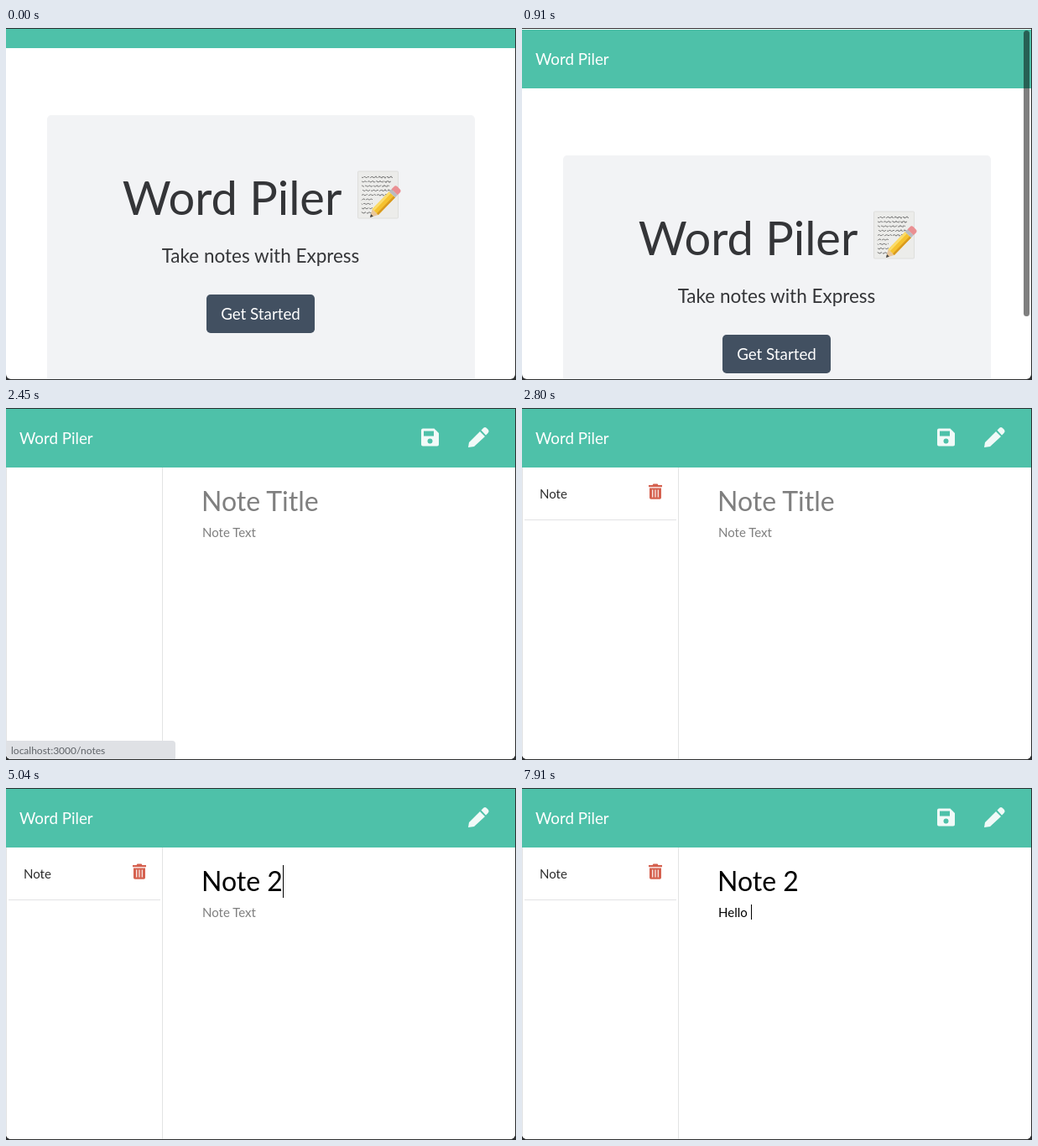
An HTML page that plays this animation: 608x420 px, repeating every 8000 ms.

```html
<!DOCTYPE html>
<html lang="en">
<head>
<meta charset="utf-8">
<title>Word Piler</title>
<style>
  html, body { margin: 0; width: 100%; height: 100%; overflow: hidden; background: #2d2f30; }
  svg { display: block; font-family: Lato, sans-serif; }
  text { white-space: pre; }
  .brand { font-size: 18.75px; fill: #fff; }
  .mid { text-anchor: middle; fill: #343538; }
  .small { font-size: 15px; }
  .big { font-size: 32px; }
  .hint { fill: #7f7f7f; }
  .icon { fill: #f1faf8; }
</style>
</head>
<body>
<svg width="608" height="420" viewBox="0 0 608 420">
  <clipPath id="window"><path d="M0 1H607V413a6 6 0 0 1-6 6H6a6 6 0 0 1-6-6Z"/></clipPath>
  <g clip-path="url(#window)">
    <rect width="608" height="420" fill="#fff"/>

    <g id="home">
      <rect y="1" width="608" height="70" fill="#4ec1a9"/>
      <text class="brand" x="16" y="43">Word Piler</text>
      <rect x="49" y="151" width="510" height="324" rx="4.8" fill="#f2f3f5"/>
      <text class="mid" x="269.5" y="270" font-size="56">Word Piler</text>
      <g id="memo">
        <rect x="419.5" y="218" width="48" height="56" rx="1" fill="#ececea" stroke="#dededc"/>
        <path id="scribble" fill="none" stroke="#666" stroke-width=".8"/>
        <g transform="translate(434 273) rotate(-46)">
          <path d="M0 0L9-5V5Z" fill="#e9c79b"/>
          <path d="M0 0L3.5-2V2Z" fill="#444"/>
          <path d="M9-5H38V5H9Z" fill="#f5c22f"/>
          <path d="M9-5H38V-2H9Z" fill="#fbdc6a"/>
          <path d="M9 2.5H38V5H9Z" fill="#d99a1f"/>
          <path d="M38-5H42V5H38Z" fill="#b9bcc0"/>
          <path d="M42-5H46a3 3 0 0 1 3 3V2a3 3 0 0 1-3 3H42Z" fill="#ea8f92"/>
        </g>
      </g>
      <text class="mid" x="303.5" y="327" font-size="22.5">Take notes with Express</text>
      <rect id="button" x="239" y="365" width="129" height="46" rx="4.8"/>
      <text class="brand" x="303.5" y="395" text-anchor="middle">Get Started</text>
    </g>
    <rect id="thumb" x="598" width="7" height="341" rx="3.5" fill="#000" fill-opacity=".5"/>

    <g id="notes">
      <rect width="608" height="420" fill="#fff"/>
      <rect y="1" width="608" height="70" fill="#4ec1a9"/>
      <text class="brand" x="16" y="43">Word Piler</text>
      <path id="save" class="icon" fill-rule="evenodd" d="M497 24.500H510.500L516 30V43.500a2 2 0 0 1-2 2H497a2 2 0 0 1-2-2V26.500a2 2 0 0 1 2-2ZM498 27.500V33.500H510V27.500ZM502.500 39.500a3 3 0 0 0 6 0a3 3 0 0 0-6 0Z"/>
      <path class="icon" d="M551 47L552 41L565 28L571 34L558 46ZM566.500 26.500L569 24Q571 22 573 24L575 26Q576.500 28 574.500 30L572 32.500Z"/>
      <path d="M.5 71V420M186.500 71V420" stroke="#e2e3e4"/>
      <g id="list">
        <text class="small" x="21" y="108" fill="#2b2b2b">Note</text>
        <path d="M3 133.500H184" stroke="#e2e3e4"/>
        <g fill="#d5614f">
          <path d="M151 92H155.500L156.500 90.500H161.500L162.500 92H167V94.300H151Z"/>
          <path d="M152 95.500H166V107a1.700 1.700 0 0 1-1.700 1.700H153.700a1.700 1.700 0 0 1-1.700-1.700Z"/>
          <path d="M155.700 97.500V106.500M159 97.500V106.500M162.300 97.500V106.500" stroke="#fff" stroke-width="1.100"/>
        </g>
      </g>
      <text id="titleHint" class="big hint" x="233" y="123">Note Title</text>
      <text id="title" class="big" x="233" y="123"></text>
      <rect id="titleCaret" y="92" width="1" height="39"/>
      <text id="bodyHint" class="small hint" x="234" y="154">Note Text</text>
      <text id="body" class="small" x="234" y="154"></text>
      <rect id="bodyCaret" y="139" width="1" height="18"/>
    </g>

    <g id="status">
      <path d="M0 397H198a4 4 0 0 1 4 4V420H0Z" fill="#dfe1e5"/>
      <text x="6" y="413" font-size="12" fill="#5f6368">localhost:3000/notes</text>
    </g>
  </g>
</svg>
<script>
const LOOP = 8000, STEP = 70, NOTES_AT = 2380, LIST_AT = 2520;
const $ = id => document.getElementById(id);
const show = (id, on) => $(id).style.display = on ? '' : 'none';
const within = (t, spans) => spans.some(([from, to]) => t >= from && t < to);

// Linear interpolation through [time, value] points
function track(t, points) {
  const i = points.findIndex(p => p[0] > t);
  if (i < 0) return points[points.length - 1][1];
  if (i === 0) return points[0][1];
  const [t0, a] = points[i - 1], [t1, b] = points[i];
  return a + (b - a) * (t - t0) / (t1 - t0);
}

const scrollPath = [[0, 47], [210, 40], [280, 40], [490, 7], [700, 0], [840, 0],
  [910, -1], [1120, -8], [1400, -2], [1470, -2], [1820, 0]];
const thumbFade = [[0, 0], [70, 1], [1470, 1], [1820, 0]];
const statusFade = [[2030, 0], [2240, 1], [2590, 1], [2800, 0]];

const fields = [
  { id: 'title', text: 'Note 2', x: 233.4, keys: [4200, 4410, 4550, 4620, 4830, 5040],
    caret: [[3220, 3710], [4200, 5530]] },
  { id: 'body', text: 'Hello ', x: 234.2, keys: [6580, 6790, 6930, 7140, 7350, 7910],
    caret: [[5740, 6300], [6580, 7840], [7910, LOOP]] }
];

function drawField(f, t) {
  const typed = f.text.slice(0, f.keys.filter(k => k <= t).length);
  const el = $(f.id);
  el.textContent = typed;
  show(f.id + 'Hint', !typed);
  show(f.id + 'Caret', within(t, f.caret));
  const width = typed ? el.getComputedTextLength() : 0;
  $(f.id + 'Caret').setAttribute('x', Math.round(f.x + width));
}

// Handwriting on the memo sheet
let ink = '';
for (let row = 0; row < 9; row++) {
  const end = row < 5 ? 37 - row % 3 * 2 : 13;
  for (let x = 0; x <= end; x++) {
    const y = 225 + row * 5.3 + 1.3 * Math.sin(x * 2.3 + row) * Math.cos(x * .9 + row * 2);
    const gap = (x + row * 3) % 10 === 0;
    ink += `${gap || !x ? 'M' : 'L'}${424 + x} ${y.toFixed(1)}`;
  }
}
$('scribble').setAttribute('d', ink);

function draw() {
  const now = performance.now() % LOOP;
  const t = Math.floor(now / STEP + 1e-6) * STEP;
  const scroll = Math.round(track(t, scrollPath));
  $('home').setAttribute('transform', `translate(0 ${-scroll})`);
  $('thumb').setAttribute('y', Math.round(3 + Math.max(0, scroll) * .8));
  $('thumb').setAttribute('opacity', track(t, thumbFade));
  $('button').setAttribute('fill', now < 2030 ? '#425061' : '#303b47');
  show('notes', now >= NOTES_AT);
  show('list', now >= LIST_AT);
  show('save', now < 4270 || now >= 6580);
  $('status').setAttribute('opacity', track(t, statusFade));
  fields.forEach(f => drawField(f, now));
  requestAnimationFrame(draw);
}
draw();
</script>
</body>
</html>
```
